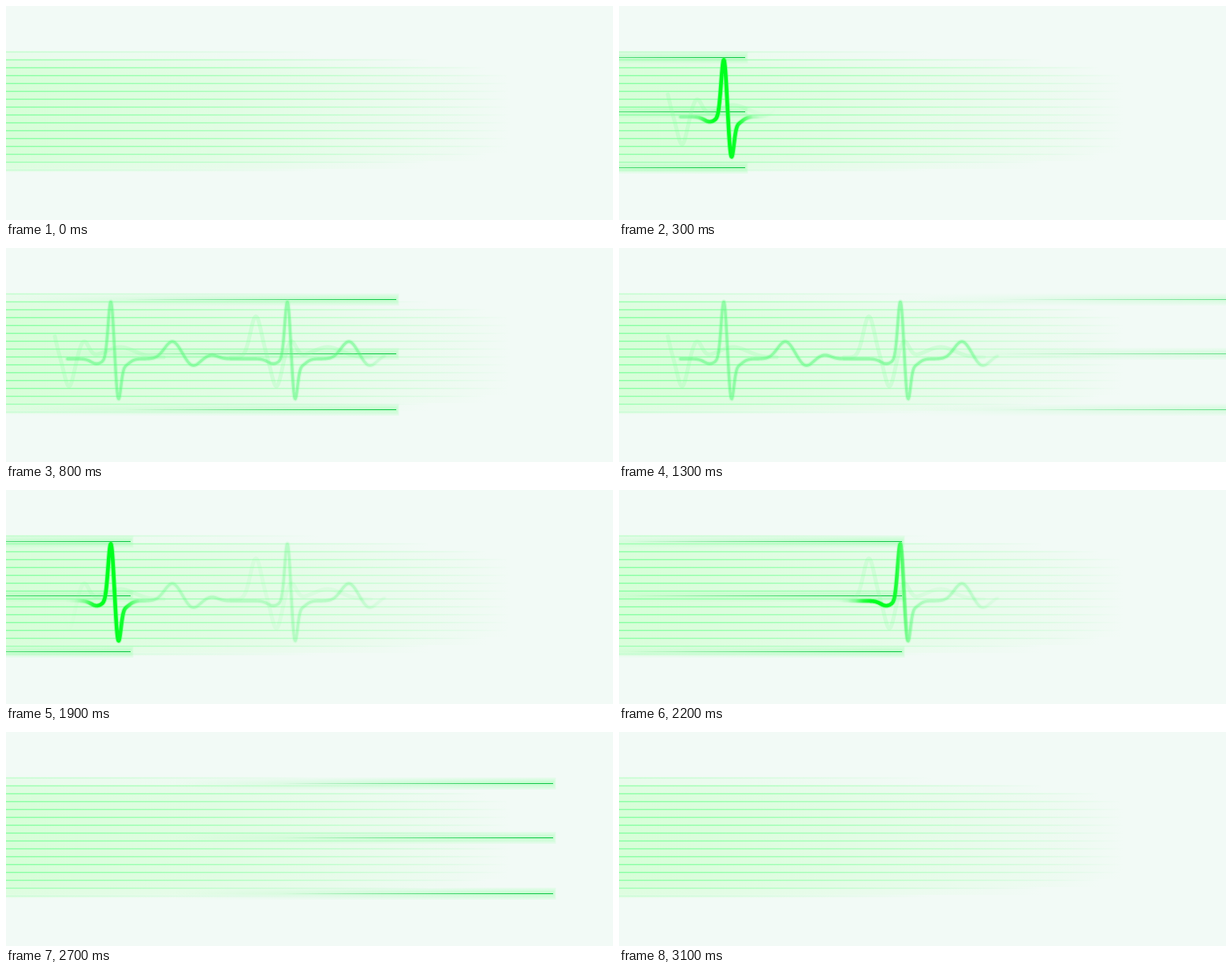
An HTML page with a canvas for the animation above (3200 ms loop, 770 by 272 pixels).

```html
<!DOCTYPE html>
<html lang="en">
<head>
<meta charset="utf-8">
<title>Heartbeat monitor</title>
<style>
html, body { margin: 0; width: 100%; height: 100%; overflow: hidden; background: #f2faf6; }
canvas { display: block; width: 770px; height: 272px; }
</style>
</head>
<body>
<canvas id="stage" width="770" height="272"></canvas>
<script>
const W = 770, H = 272, LOOP = 3200, STEP = 100;
const BASE = 141, BEATS = [133, 357], ECHO_SHIFT = [-79, -40];
const ctx = document.getElementById('stage').getContext('2d');

const clamp = v => Math.min(1, Math.max(0, v));
const smooth = (x, a, b) => {
  const u = clamp((x - a) / (b - a));
  return u * u * (3 - 2 * u);
};
const bump = (d, height, width) => height * Math.exp(-0.5 * (d / width) ** 2);

// Height offset of one heartbeat, d pixels after its peak
const beat = d =>
  bump(d + 18, 6, 7) + bump(d, -74, 3.4) + bump(d - 9.5, 46, 3.2) +
  bump(d - 16, 9, 7) + bump(d - 78, -22, 10) + bump(d - 104, 9, 8) + bump(d - 128, -5, 8);

const echo = d =>
  bump(d, -52, 7) + bump(d - 26, 37, 6) + bump(d - 45, -20, 6) + bump(d - 91, -13, 18);

function plot(from, to, y) {
  const path = new Path2D();
  for (let x = from; x <= to; x += 0.5) path.lineTo(x, y(x));
  return path;
}

const pulse = plot(78, 480, x => BASE + BEATS.reduce((sum, b) => sum + beat(x - b), 0));
const echoes = BEATS.map((b, i) => {
  const peak = b + ECHO_SHIFT[i];
  return plot(Math.max(62, peak - 32), peak + 146, x => BASE - 2 + echo(x - peak));
});

// Horizontal gradient across the stage; alpha is a function of x
function fade(rgb, alpha) {
  const g = ctx.createLinearGradient(0, 0, W, 0), n = 77;
  for (let i = 0; i <= n; i++) {
    g.addColorStop(i / n, `rgba(${rgb},${clamp(alpha(i / n * W)).toFixed(3)})`);
  }
  return g;
}

function bar(y, w, h, paint) {
  ctx.fillStyle = paint;
  ctx.fillRect(0, y, w, h);
}

function trace(path, width, paint) {
  ctx.lineWidth = width;
  ctx.strokeStyle = paint;
  ctx.stroke(path);
}

function drawGrid() {
  for (let i = 0; i < 16; i++) {
    const y = 58 + i * 10;
    const edge = Math.max(0, (Math.abs(i - 7.5) - 3.5) / 4) ** 3;
    const end = 640 - 245 * edge, level = 1 - 0.65 * edge;
    const ramp = (rgb, a) => fade(rgb, x => a * level * clamp(1 - x / end) ** 0.9);
    bar(y - 1, end, i === 15 ? 4 : 10, ramp('208,255,208', 0.8));
    bar(y - 1, end, 3, ramp('180,255,192', 0.45));
    bar(y, end, 1, ramp('100,255,140', 0.68));
  }
}

function drawSweep(head) {
  const power = clamp(1 - (head - W) / 150);
  if (!power) return;
  const ramp = (rgb, a, len) => fade(rgb, x => a * power * (1 - clamp((head - x) / len) ** 1.2));
  const glow = ramp('165,255,180', 0.2, 480), core = ramp('0,195,60', 0.95, 345);
  for (const y of [65, 134, 205]) {
    for (let r = 7; r > 0; r -= 2) bar(y - r, head + r / 2, 2 * r + 1, glow);
    bar(y, head, 1, core);
  }
}

function drawTrail(pass, head) {
  const drawn = x => pass === 0
    ? 1 - smooth(x, head - 20, head + 40)
    : smooth(x, head - 85, head - 45) * (0.9 - 0.35 * smooth(x, head, head + 40));
  const paint = (rgb, a) => fade(rgb, x => a * drawn(x) * (1 - 0.75 * smooth(x, 435, 480)));
  for (const e of echoes) trace(e, 5, paint('130,255,155', 0.22));
  trace(pulse, 6, paint('130,255,155', 0.24));
  trace(pulse, 3.4, paint('70,248,110', 0.42));

  // The line flares where a beat has just been passed
  const heat = Math.max(...BEATS.map(b => head < b ? 0 : 1 - smooth(head - b, 30, 130)));
  if (!heat) return;
  const hot = a => fade('0,255,30', x => a * heat * Math.exp(-(((x - head + 27) / 28) ** 4)));
  trace(pulse, 7, hot(0.2));
  trace(pulse, 4.6, hot(1));
}

function draw(frame) {
  // The picture after the first sweep is held for one more step
  const shown = frame === 16 ? 15 : frame;
  const pass = Math.floor(shown / 16);
  const head = 67 * (shown % 16) - 41 - 2 * pass;
  bar(0, W, H, '#f2faf6');
  drawGrid();
  if (head > 0) drawSweep(head);
  drawTrail(pass, head);
}

ctx.lineCap = 'round';
ctx.lineJoin = 'round';
const start = performance.now();
let last = -1;
function tick() {
  const frame = Math.floor((performance.now() - start) % LOOP / STEP);
  if (frame !== last) draw(last = frame);
  requestAnimationFrame(tick);
}
tick();
</script>
</body>
</html>
```
